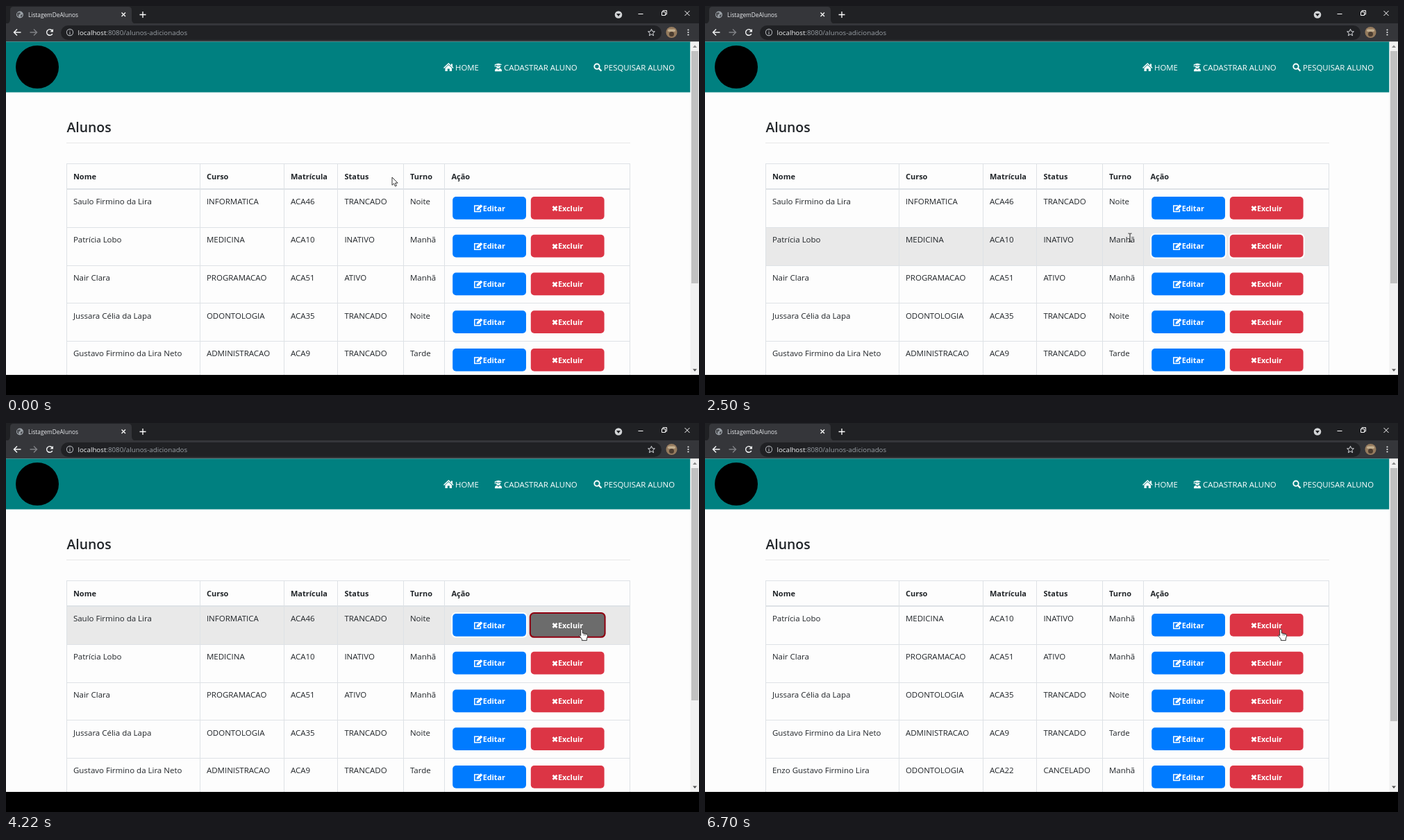
These frames come from a looping animation (998 px wide and 561 px high, 8000 ms). An HTML page with a canvas:

```html
<!DOCTYPE html>
<html lang="pt-BR">
<head>
<meta charset="utf-8">
<title>ListagemDeAlunos</title>
<style>
html, body { margin: 0; width: 100%; height: 100%; overflow: hidden; background: #000; }
canvas { display: block; width: 998px; height: 561px; }
</style>
</head>
<body>
<canvas id="stage" width="998" height="561"></canvas>
<script>
const g = document.getElementById('stage').getContext('2d');
const LOOP = 8000, RELOAD = 5900;
const SANS = '"Open Sans", "Noto Sans", sans-serif';
const ROW_TOP = 264, ROW_H = 54.75, PAD = 9.9, CELL_SIZE = 11.5;
const COLS = [87, 279, 400, 477.5, 572, 631.5, 898];
const HEADS = ['Nome', 'Curso', 'Matrícula', 'Status', 'Turno', 'Ação'];
const STUDENTS = [
  ['Saulo Firmino da Lira', 'INFORMATICA', 'ACA46', 'TRANCADO', 'Noite'],
  ['Patrícia Lobo', 'MEDICINA', 'ACA10', 'INATIVO', 'Manhã'],
  ['Nair Clara', 'PROGRAMACAO', 'ACA51', 'ATIVO', 'Manhã'],
  ['Jussara Célia da Lapa', 'ODONTOLOGIA', 'ACA35', 'TRANCADO', 'Noite'],
  ['Gustavo Firmino da Lira Neto', 'ADMINISTRACAO', 'ACA9', 'TRANCADO', 'Tarde'],
  ['Enzo Gustavo Firmino Lira', 'ODONTOLOGIA', 'ACA22', 'CANCELADO', 'Manhã']
];
// pointer: time, x, y
const PATH = [
  [0, 556, 247], [240, 556, 247], [620, 543, 256], [980, 514, 267],
  [1400, 190, 280], [1860, 610, 286], [2120, 622, 304], [2500, 612, 334],
  [2740, 650, 339], [3080, 761, 318], [3500, 824, 299], [4170, 824, 299],
  [4220, 829, 297], [LOOP, 829, 297]
];

function rect(x, y, w, h, color) {
  g.fillStyle = color;
  g.fillRect(x, y, w, h);
}
function pill(x, y, w, h, r, color) {
  g.fillStyle = color;
  g.beginPath();
  g.roundRect(x, y, w, h, r);
  g.fill();
}
function disc(x, y, r, color) {
  g.fillStyle = color;
  g.beginPath();
  g.arc(x, y, r, 0, 7);
  g.fill();
}
function ring(x, y, r, color, width, from = 0, to = 7) {
  g.strokeStyle = color;
  g.lineWidth = width;
  g.beginPath();
  g.arc(x, y, r, from, to);
  g.stroke();
}
function line(d, color, width) {
  g.strokeStyle = color;
  g.lineWidth = width;
  g.stroke(new Path2D(d));
}
function shape(d, color) {
  g.fillStyle = color;
  g.fill(new Path2D(d));
}
function at(x, y, draw) {
  g.save();
  g.translate(x, y);
  draw();
  g.restore();
}
function text(s, x, y, size, color, weight = 400) {
  g.font = `${weight} ${size}px ${SANS}`;
  g.fillStyle = color;
  g.fillText(s, x, y);
}
function mix(a, b, p) {
  return `rgb(${a.map((v, i) => Math.round(v + (b[i] - v) * p))})`;
}

function slope(k, axis) {
  if (k === 0 || k === PATH.length - 1) return 0;
  const [a, b, c] = [PATH[k - 1], PATH[k], PATH[k + 1]];
  if ((b[axis] - a[axis]) * (c[axis] - b[axis]) <= 0) return 0;
  return (c[axis] - a[axis]) / (c[0] - a[0]);
}
function pointer(t) {
  let k = 0;
  while (k < PATH.length - 2 && t >= PATH[k + 1][0]) k++;
  const a = PATH[k], b = PATH[k + 1], d = b[0] - a[0], u = (t - a[0]) / d;
  const s = u * u * (3 - 2 * u);
  return [1, 2].map(i => a[i] + (b[i] - a[i]) * s +
    d * u * (1 - u) * ((1 - u) * slope(k, i) - u * slope(k + 1, i)));
}

function browser() {
  rect(0, 0, 998, 26, '#202124');
  rect(0, 25, 998, 26.5, '#35363a');
  shape('M0 26Q6 25 6 19V6Q6 1 11 1H176Q181 1 181 6V19Q181 25 187 26Z', '#35363a');
  disc(20, 12.5, 5, '#9aa0a6');
  shape('M16 10L20 9L21 11L18 13L19 16L16 14ZM21 13L24 12L23 15L21 16Z', '#4a4c50');
  text('ListagemDeAlunos', 32, 15.5, 8.3, '#e8eaed');
  line('M166.5 9.5L172 15M172 9.5L166.5 15', '#fff', 1.3);
  line('M192.5 12.5H201.5M197 8V17', '#fff', 1.3);
  disc(882, 12.5, 5.3, '#d2d4d6');
  shape('M879 11H885L882 15Z', '#202124');
  line('M910.5 11.5H917.5M944.5 8.5H949.5V13.5H944.5ZM946 8V6.5H951.5V12H950M977.5 7L984.5 14M984.5 7L977.5 14', '#fff', 1);

  pill(79, 28, 865, 21, 10.5, '#202124');
  line('M21.5 38H12M16 33.5L11.5 38L16 42.5', '#f1f3f4', 1.5);
  line('M34.5 38H44M40 33.5L44.5 38L40 42.5', '#808286', 1.4);
  ring(63, 38, 4.3, '#f1f3f4', 1.5, .5, 5.6);
  shape('M68 33V37.5H63.5Z', '#f1f3f4');
  ring(92, 38, 4.6, '#aeb1b5', 1.1);
  line('M92 37.2V41M92 35.2V36.3', '#aeb1b5', 1.1);
  text('localhost', 103.5, 41.5, 9.75, '#f1f3f4');
  const w = g.measureText('localhost').width;
  text(':8080/alunos-adicionados', 103.5 + w, 41.5, 9.75, '#9aa0a6');
  line('M929.5 33.3L930.9 36.6L934.4 36.9L931.7 39.2L932.6 42.7L929.5 40.8L926.4 42.7L927.3 39.2L924.6 36.9L928.1 36.6Z', '#dadce0', 1);
  disc(958.5, 38, 8, '#957b5e');
  pill(953, 33.5, 11, 3.5, 1.7, '#c4b090');
  disc(958.5, 40.5, 3.5, '#4c3d30');
  for (const y of [34.5, 38, 41.5]) disc(982.5, y, 1.1, '#e8eaed');
}

function navbar() {
  rect(0, 51.5, 985.5, 73, '#008080');
  disc(45, 88, 31, '#000');
  shape('M630 89L637.3 82L641 85.5V83.5H643V87.4L644.6 89L643.7 90L637.3 84L631 90ZM632.5 89.6L637.3 85.1L642 89.6V94H638.8V90.5H635.8V94H632.5Z', '#fff');
  shape('M703.5 84.3L709 82.7L714.5 84.3L709 86ZM705.7 86.1L709 87L712.3 86.1Q712.5 89.8 709 90Q705.5 89.8 705.7 86.1ZM704 94.2Q703.6 90.5 707 90L709 92L711 90Q714.4 90.5 714 94.2ZM703.9 84H704.8V88H703.9Z', '#fff');
  ring(851, 87.2, 3.7, '#fff', 1.9);
  line('M853.8 90L857.5 93.7', '#fff', 2.3);
  text('HOME', 647, 92.8, 11.4, '#fff');
  text('CADASTRAR ALUNO', 717, 92.8, 11.45, '#fff');
  text('PESQUISAR ALUNO', 861, 92.8, 11.4, '#fff');
}

function scrollbar(end) {
  rect(985.5, 51.5, 12.5, 481, '#f1f1f1');
  rect(987, 65, 10, end - 65, '#c1c1c1');
  shape('M989 60H995L992 56.5Z', '#8a8a8a');
  shape('M989 523.5H995L992 527Z', '#505050');
}

function button(x, y, fill, border, label, labelX) {
  pill(x - 2, y - 2, 109.8, 36.8, 6.5, border);
  pill(x, y, 105.8, 32.8, 5, fill);
  text(label, labelX, y + 20.7, 10.8, '#fff', 700);
}

function tableRow(cells, i, hovered, press) {
  const y = Math.round(ROW_TOP + ROW_H * i), top = 275 + ROW_H * i;
  if (hovered) rect(87, y, 812, 55, '#e9e9e9');
  cells.forEach((s, c) => text(s, COLS[c] + PAD, Math.round(286.3 + ROW_H * i), CELL_SIZE, '#212529'));
  button(643.2, top, '#007bff', '#fdfdfd', 'Editar', 686.7);
  at(680, top + 17, () => {
    line('M1.5 -4H-5.2V4.6H3.4V1', '#fff', 1.5);
    shape('M-2.5 2.6L-2 -.2L3.8 -5.8L6.4 -3.2L.6 2.3Z', '#fff');
  });
  button(755.8, top, mix([220, 53, 69], [108, 108, 108], press),
    mix([253, 253, 253], [143, 0, 16], press), 'Excluir', 795);
  at(790.5, top + 17, () => line('M-3 -3L3 3M3 -3L-3 3', '#fff', 2.6));
}

function table(rows, hover, press) {
  text('Alunos', 87.5, 181.5, 19.4, '#212529', 600);
  rect(87, 197, 812, 1, '#e7e7e7');
  HEADS.forEach((s, c) => text(s, COLS[c] + PAD, 250, 11, '#212529', 700));
  rows.slice(0, 5).forEach((r, i) => tableRow(r, i, i === hover, i === 0 ? press : 0));
  const edge = '#dee2e6';
  for (const x of COLS) rect(Math.floor(x), 227, 1, 305, edge);
  rect(87, 227, 812, 1, edge);
  rect(87, 263, 812, 2, edge);
  for (let i = 1; i < 5; i++) rect(87, Math.round(ROW_TOP + ROW_H * i), 812, 1, edge);
}

function overText(rows, hover, x, y) {
  if (hover < 0) return false;
  const dy = y - ROW_TOP - ROW_H * hover;
  if (dy < 10 || dy > 26) return false;
  g.font = `400 ${CELL_SIZE}px ${SANS}`;
  return rows[hover].some((s, c) => {
    const left = COLS[c] + PAD;
    return x > left && x < left + g.measureText(s).width;
  });
}

function cursor(kind, x, y) {
  at(x, y, () => {
    g.lineJoin = 'round';
    if (kind === 'text') {
      line('M-2.5 -6H-.5L0 -5.5L.5 -6H2.5M0 -5.5V5.5M-2.5 6H-.5L0 5.5L.5 6H2.5', '#222', 1);
      return;
    }
    const d = kind === 'hand'
      ? 'M-1.3 1.2Q0 -.6 1.3 1.2V6L3.6 6.3L5.8 7L8 7.8Q8.8 8.4 8.5 10.5L7.4 14V16.6H.4V14.6L-3.6 9.8Q-3.2 7.8 -1.3 9.8Z'
      : 'M0 0V11.3L2.6 8.9L4.5 13L6.4 12.2L4.6 8.2H8.1Z';
    shape(d, '#fff');
    line(d, '#222', .9);
    if (kind === 'hand') line('M3.5 6.5V9.5M5.8 7V9.7', '#222', .7);
  });
}

function draw(t) {
  const reloaded = t >= RELOAD;
  const rows = reloaded ? STUDENTS.slice(1) : STUDENTS;
  const [x, y] = pointer(t);
  const hover = reloaded || y < ROW_TOP ? -1 : Math.floor((y - ROW_TOP) / ROW_H);
  const u = reloaded ? 0 : Math.min(1, Math.max(0, (t - 3340) / 580));
  const onButton = x > 754 && x < 863 && y > 273 && y < 309.5;

  rect(0, 0, 998, 561, '#fdfdfd');
  browser();
  navbar();
  table(rows, hover, u * u * (3 - 2 * u));
  scrollbar(reloaded ? 430 : 400);
  rect(0, 532, 998, 29, '#000');
  cursor(onButton ? 'hand' : overText(rows, hover, x, y) ? 'text' : 'arrow', x, y);
}

const start = performance.now();
function tick() {
  draw((performance.now() - start) % LOOP);
  requestAnimationFrame(tick);
}
tick();
</script>
</body>
</html>
```
